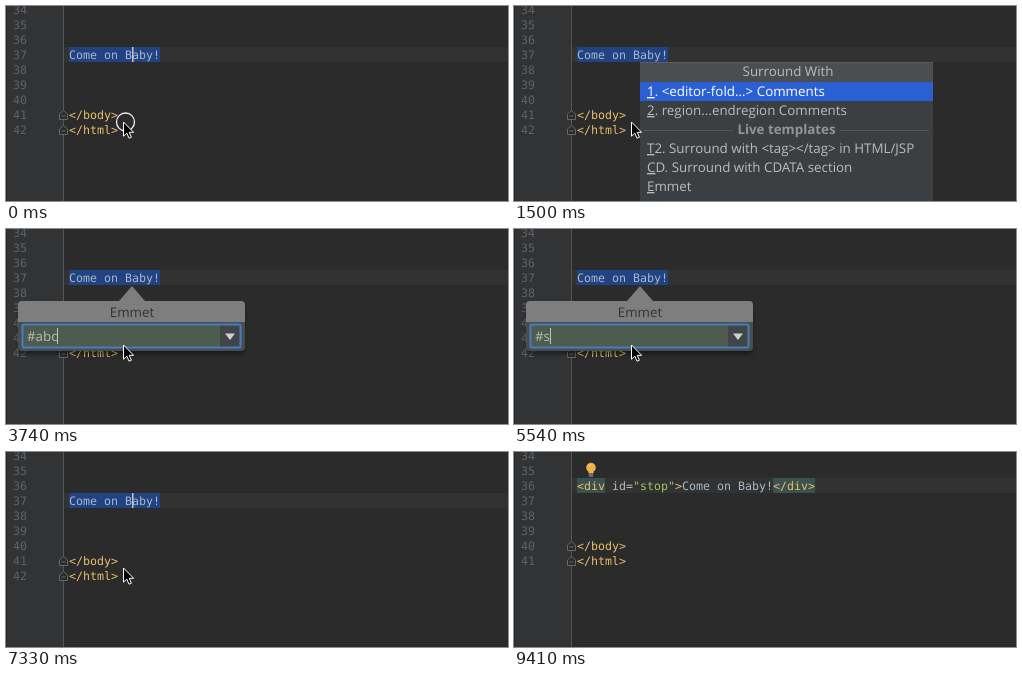
Write an HTML page that moves like this. It is 502 by 195 pixels and loops after 9510 ms.

```html
<!DOCTYPE html>
<html lang="en">
<head>
<meta charset="utf-8">
<title>Surround with Emmet</title>
<style>
  html, body { margin: 0; width: 100%; height: 100%; overflow: hidden; background: #2b2b2b; }
  svg { display: block; width: 502px; height: 195px; }
  text { white-space: pre; text-rendering: geometricPrecision; }
  .code { font: 11.63px "DejaVu Sans Mono", monospace; fill: #a9b7c6; }
  .num { fill: #606366; }
  .tag { fill: #e8bf6a; }
  .attr { fill: #bababa; }
  .str { fill: #a5c261; }
  .ui { font: 13.35px "Open Sans", sans-serif; fill: #bbb; }
  .mid { text-anchor: middle; }
  .key { text-decoration: underline; }
  .fold { fill: #2b2b2b; stroke: #66686a; }
  .caret { fill: #c4c4c4; }
  .sel { fill: #214283; }
  .row { fill: #323232; }
  [data-on] { visibility: hidden; }
</style>
</head>
<body>
<svg viewBox="0 0 502 195">
  <defs>
    <path id="fold" class="fold" d="M53.5 9.5V4L57.5 .5 61.5 4V9.5ZM55.5 6H59.5"/>
    <g id="bulb">
      <path d="M77 .8a4.8 4.8 0 0 1 2.6 8.8V11h-5.2V9.6A4.8 4.8 0 0 1 77 .8Z" fill="#f2b04b"/>
      <path d="M75 4.2a2.6 2.6 0 0 1 2.2-1.6" fill="none" stroke="#fbdc9c"/>
      <path d="M74.6 12h4.8M75 14h4" stroke="#b4b4b4" stroke-width="1.2"/>
    </g>
    <filter id="soft" x="-10%" y="-30%" width="120%" height="170%">
      <feGaussianBlur stdDeviation="2.2"/>
    </filter>
  </defs>

  <rect width="502" height="195" fill="#2b2b2b"/>
  <rect width="57" height="195" fill="#313335"/>
  <rect width="1" height="195" fill="#292a2b"/>
  <rect x="57" width="1" height="195" fill="#555"/>
  <g id="nums"></g>

  <!-- selected text -->
  <g data-on="0-7480">
    <rect class="row" x="58" y="41" width="444" height="15"/>
    <rect class="sel" x="63" y="41" width="91" height="15"/>
    <text class="code" x="63" y="53">Come on Baby!</text>
    <text class="code num" x="7" y="128">42</text>
    <use href="#fold" y="104"/>
    <use href="#fold" y="119"/>
    <text class="code tag" x="63" y="113">&lt;/body&gt;</text>
    <text class="code tag" x="63" y="128">&lt;/html&gt;</text>
  </g>
  <rect class="caret" data-on="0-1050 2550-2700 7330-7480" x="126" y="41" width="1.5" height="15"/>
  <use href="#bulb" y="25" data-on="750-1500"/>

  <!-- wrapped text -->
  <g data-on="7480-9510">
    <rect class="row" x="58" y="26" width="444" height="15"/>
    <g fill="#3b514d" data-on="7630-9510">
      <rect x="63" y="26" width="28" height="15"/>
      <rect x="259" y="26" width="42" height="15"/>
    </g>
    <text class="code" x="63" y="38"><tspan class="tag">&lt;div</tspan><tspan class="attr"> id=</tspan><tspan class="str">"stop"</tspan><tspan class="tag">&gt;</tspan>Come on Baby!<tspan class="tag">&lt;/div&gt;</tspan></text>
    <use href="#fold" y="89"/>
    <use href="#fold" y="104"/>
    <text class="code tag" x="63" y="98">&lt;/body&gt;</text>
    <text class="code tag" x="63" y="113">&lt;/html&gt;</text>
  </g>
  <rect class="caret" data-on="7480-8370 8970-9410" x="168" y="26" width="1.5" height="15"/>
  <use href="#bulb" y="10" data-on="8070-9510"/>

  <!-- surround menu -->
  <g data-on="1500-2550">
    <rect x="126" y="56" width="293" height="139" fill="#3c3f41"/>
    <rect x="126" y="56" width="293" height="20" fill="#4b4e50"/>
    <rect x="126" y="56" width="293" height="1" fill="#5a5d5f"/>
    <rect x="126" y="76" width="293" height="19" fill="#2a60d3"/>
    <path d="M130 124.5H219M326 124.5H415" stroke="#55585a"/>
    <text class="ui mid" x="274" y="70">Surround With</text>
    <text class="ui" x="133" y="90" style="fill:#fff"><tspan class="key">1</tspan>. &lt;editor-fold...&gt; Comments</text>
    <text class="ui" x="133" y="109"><tspan class="key">2</tspan>. region...endregion Comments</text>
    <text class="ui mid" x="272.5" y="128" style="font-weight:700;fill:#949494">Live templates</text>
    <text class="ui" x="133" y="147"><tspan class="key">T</tspan>2. Surround with &lt;tag&gt;&lt;/tag&gt; in HTML/JSP</text>
    <text class="ui" x="133" y="166"><tspan class="key">C</tspan>D. Surround with CDATA section</text>
    <text class="ui" x="133" y="185"><tspan class="key">E</tspan>mmet</text>
  </g>

  <!-- abbreviation balloon -->
  <g data-on="2700-7330">
    <rect x="13" y="76" width="225" height="49" rx="4" opacity=".45" filter="url(#soft)"/>
    <rect x="12" y="72" width="227" height="50" rx="4" fill="#4a4c4e"/>
    <path d="M12 93V76a4 4 0 0 1 4-4H113L126 57 139 72H235a4 4 0 0 1 4 4V93Z" fill="#7e7e7e"/>
    <text class="ui mid" x="126" y="88" style="fill:#333">Emmet</text>
    <rect x="17" y="96" width="217" height="22" fill="#4e5b4f"/>
    <rect x="214" y="96" width="20" height="22" fill="#414547"/>
    <rect x="16.5" y="95.5" width="218" height="23" rx="1.5" fill="none" stroke="#437fc0" stroke-width="2"/>
    <path d="M219 104.5H229L224 111Z" fill="#d0d0d0"/>
    <rect class="sel" data-on="2700-3740" x="21" y="99" width="30" height="16"/>
    <text class="ui" id="field" x="21" y="112"></text>
    <rect class="caret" id="bar" data-on="2700-3140 3740-5090 5540-7040" y="99" width="1" height="16"/>
  </g>

  <!-- pointer -->
  <circle data-on="0-150" cx="119.5" cy="116" r="9" fill="none" stroke="#f0f0f0" stroke-width="1.3"/>
  <path data-on="0-7480" d="M117.5 116V130.2L120.8 127.1 123 132.2 125.4 131.2 123.2 126.3H127.6Z" fill="#000" stroke="#fff"/>
  <g data-on="7480-8670" fill="none" stroke-linecap="round">
    <path id="beam" d="M115.5 112.5q3 0 3 2.5 0-2.5 3-2.5M118.5 115V126.5M115.5 129q3 0 3-2.5 0 2.5 3 2.5M116.7 123.5H120.3" stroke="#fff" stroke-width="2.6"/>
    <use href="#beam" style="display:none"/>
    <path d="M115.5 112.5q3 0 3 2.5 0-2.5 3-2.5M118.5 115V126.5M115.5 129q3 0 3-2.5 0 2.5 3 2.5M116.7 123.5H120.3" stroke="#111"/>
  </g>
</svg>
<script>
  const LOOP = 9510;
  // time, field text, caret x
  const typing = [
    [0, '#abc', 51], [4190, '#ab', 44], [4340, '#a', 36], [4640, '#', 29],
    [5540, '#s', 36], [6140, '#st', 41], [6290, '#sto', 49], [6440, '#stop', 57]
  ];
  const field = document.getElementById('field');
  const bar = document.getElementById('bar');

  let rows = '';
  for (let n = 34; n < 42; n++) {
    rows += `<text class="code num" x="7" y="${8 + (n - 34) * 15}">${n}</text>`;
  }
  document.getElementById('nums').innerHTML = rows;

  const parts = [...document.querySelectorAll('[data-on]')].map(el => ({
    el,
    spans: el.dataset.on.split(' ').map(s => s.split('-').map(Number))
  }));

  function draw(t) {
    for (const { el, spans } of parts) {
      const on = spans.some(([a, b]) => t >= a && t < b);
      el.style.visibility = on ? 'visible' : 'hidden';
    }
    const [, text, x] = typing.filter(s => s[0] <= t).pop();
    if (field.textContent !== text) field.textContent = text;
    bar.setAttribute('x', x);
  }

  const start = performance.now();
  function tick() {
    draw((performance.now() - start) % LOOP);
    requestAnimationFrame(tick);
  }
  draw(0);
  requestAnimationFrame(tick);
</script>
</body>
</html>
```
